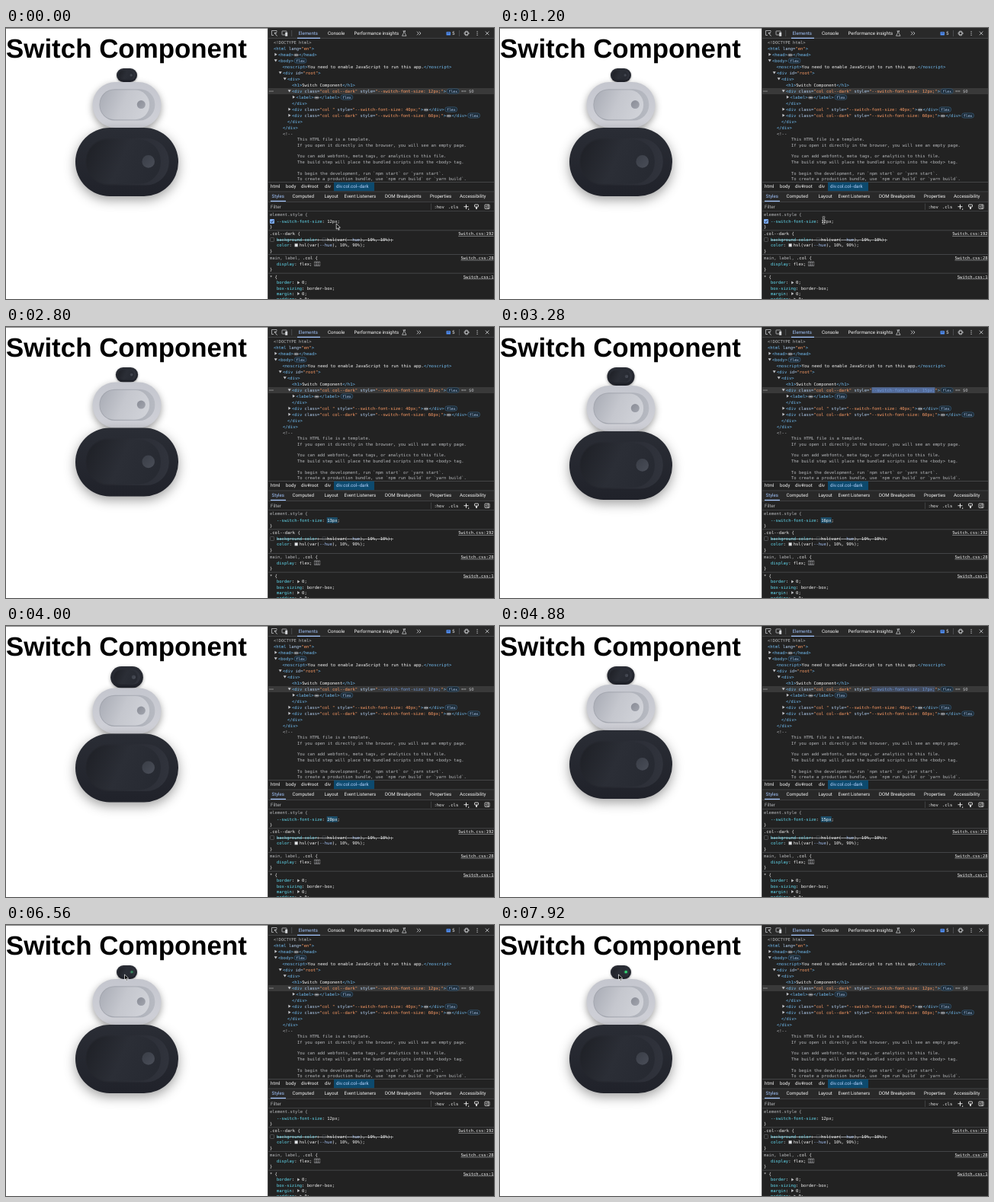
Recreate the animation shown at these times as an HTML page with a canvas. Size 640 px wide and 356 px high, loop 8 s.

```html
<!DOCTYPE html>
<html lang="en">
<head>
<meta charset="utf-8">
<title>Switch Component</title>
<style>
html, body { margin: 0; width: 100%; height: 100%; overflow: hidden; background: #fff; }
canvas { display: block; }
</style>
</head>
<body>
<canvas id="stage" width="640" height="356"></canvas>
<script>
const ctx = document.getElementById('stage').getContext('2d');
const LOOP = 8000;
const CH = 3.31; // width of one mono character
const MONO = '5.5px "DejaVu Sans Mono", monospace';
const UI = '6.15px Roboto, sans-serif';
const C = {
  panel: '#222222', bar: '#292929', line: '#5a5c60', text: '#f4f4f4', dim: '#b6b8bb',
  tag: '#72bdf2', attr: '#b4d0f2', value: '#ff9d66', prop: '#62dcf2', blue: '#a2c4fb', sel: '#0d4a6e'
};
const DARK = {
  base: ['#2a2d35', '#20222a'], rim: ['#23252c', '#30333c'],
  face: ['#1f2127', '#2b2e36', '#272a32'], knob: ['#3b3f48', '#4a4e58']
};
const LIGHT = {
  base: ['#c4c6ce', '#d0d1d8'], rim: ['#9fa2ab', '#b6b9c1'],
  face: ['#abaeb7', '#c5c7ce', '#d0d2d8'], knob: ['#8b8e98', '#a1a4ad']
};

// [time, px] steps: typed value, and the slower echo in the element tree
const TYPED = [[0, 12], [2640, 13], [2820, 14], [3000, 15], [3180, 16], [3390, 17], [3600, 18], [3800, 19], [3970, 20],
  [4200, 19], [4370, 18], [4540, 17], [4700, 16], [4860, 15], [5030, 14], [5200, 13], [5370, 12]];
const ECHO = [[0, 12], [2880, 13], [3240, 15], [3600, 17], [4150, 20], [4600, 17], [5050, 14], [5440, 12]];

const clamp = v => Math.max(0, Math.min(1, v));
const ease = v => { v = clamp(v); return v * v * (3 - 2 * v); };
const last = (steps, t) => steps.filter(s => s[0] <= t).pop() || steps[0];

function box(x, y, w, h, fill) { ctx.fillStyle = fill; ctx.fillRect(x, y, w, h); }

function pill(x, y, w, h, r, fill) {
  ctx.beginPath();
  ctx.roundRect(x, y, w, h, r);
  ctx.fillStyle = fill;
  ctx.fill();
}

function stroke(color, width, ...pts) {
  ctx.strokeStyle = color;
  ctx.lineWidth = width;
  ctx.beginPath();
  pts.forEach(([x, y], i) => i ? ctx.lineTo(x, y) : ctx.moveTo(x, y));
  ctx.stroke();
}

function ring(x, y, w, h, r, color, width = 0.6) {
  ctx.strokeStyle = color;
  ctx.lineWidth = width;
  ctx.beginPath();
  ctx.roundRect(x, y, w, h, r);
  ctx.stroke();
}

// y is the middle of the line; returns the right end
function text(s, x, y, color = C.text, font = MONO) {
  ctx.font = font;
  ctx.fillStyle = color;
  ctx.fillText(s, x, y + 1.7);
  return x + ctx.measureText(s).width;
}

function arrow(x, y, open, color = '#c4c6ca') {
  ctx.fillStyle = color;
  ctx.beginPath();
  if (open) { ctx.moveTo(x - 2, y - 1.7); ctx.lineTo(x + 2, y - 1.7); ctx.lineTo(x, y + 1.5); }
  else { ctx.moveTo(x - 1.3, y - 2.2); ctx.lineTo(x + 1.9, y - 0.2); ctx.lineTo(x - 1.3, y + 1.8); }
  ctx.fill();
}

function dots(x, y, step) {
  for (let i = 0; i < 3; i++) box(x + i * step, y, 0.9, 0.9, C.text);
}

function badge(x, y) {
  pill(x, y - 3.2, 16, 6.4, 3.2, '#1b2a36');
  ring(x, y - 3.2, 16, 6.4, 3.2, '#477193', 0.5);
  text('flex', x + 2.3, y - 0.1, '#b9d4fb', '4.8px "DejaVu Sans Mono", monospace');
}

function markup(src, x, y, flash = false) {
  for (const s of src.split(/(<\/?\w+|>|[\w-]+=|"[^"]*"|⋯|~)/)) {
    if (!s) continue;
    if (s === '~') { badge(x + 1.2, y); x += 20; continue; }
    if (s === '⋯') {
      pill(x + 0.5, y - 1.6, 6.5, 4, 2, '#5f6368');
      dots(x + 1.9, y, 1.5);
      x += 7.5;
      continue;
    }
    const color = /^<|>/.test(s) ? C.tag : /=$/.test(s) ? C.attr : s[0] === '"' ? C.value : C.text;
    if (flash && s.startsWith('"--')) {
      x = text('"', x, y, C.value);
      x = text(s.slice(1, -1), x, y, '#6f98d8');
      x = text('"', x, y, C.value);
    } else x = text(s, x, y, color);
  }
  return x;
}

function knobSwitch(top, em, pal, on = 0) {
  const cx = 158.5, cy = top + em * 0.75;
  const grad = (x0, y0, x1, y1, stops) => {
    const g = ctx.createLinearGradient(cx + x0 * em, cy + y0 * em, cx + x1 * em, cy + y1 * em);
    stops.forEach((c, i) => g.addColorStop(i / (stops.length - 1), c));
    return g;
  };
  const part = (x, y, w, h, r, fill) => pill(cx + x * em, cy + y * em, w * em, h * em, r * em, fill);
  ctx.save();
  ctx.shadowColor = 'rgba(0,0,0,.38)';
  ctx.shadowBlur = em * 0.24;
  ctx.shadowOffsetY = em * 0.08;
  part(-1.125, -0.75, 2.25, 1.5, 0.75, grad(0, -0.75, 0, 0.75, pal.base));
  ctx.restore();
  part(-0.9, -0.52, 1.82, 1.03, 0.5, grad(-0.9, 0, 0.9, 0, pal.rim));
  part(-0.88, -0.49, 1.62, 0.97, 0.47, grad(-0.85, -0.35, 0.6, 0.3, pal.face));
  ctx.beginPath();
  ctx.arc(cx + em * 0.47, cy - em * 0.01, em * 0.138, 0, 7);
  ctx.fillStyle = grad(0.35, -0.13, 0.6, 0.13, pal.knob);
  ctx.fill();
  if (on > 0) {
    ctx.save();
    ctx.globalAlpha = on;
    ctx.shadowColor = '#1fd36b';
    ctx.shadowBlur = 2;
    ctx.beginPath();
    ctx.arc(cx + em * 0.56, cy - 0.3, 1.6, 0, 7);
    ctx.fillStyle = '#35d873';
    ctx.fill();
    ctx.restore();
  }
}

function page(t) {
  box(0, 0, 343, 356, '#fff');
  box(0, 0, 343, 1, '#8a8a8a');
  text('Switch Component', 0, 36.8, '#000', 'bold 34.9px "Liberation Sans", Arial, sans-serif');
  const em = last(TYPED, t - 70)[1];
  const top = 53 + em * 1.5;
  knobSwitch(53, em, DARK, ease((t - 6380) / 480));
  knobSwitch(top, 40, LIGHT);
  knobSwitch(top + 60, 60, DARK);
}

function toolbar() {
  const icon = '#d4d6d9';
  box(343, 0, 297, 356, C.panel);
  box(343, 0, 297, 14, C.bar);
  box(343, 13.5, 297, 0.5, C.line);
  box(343, 0, 1, 356, '#4a4a4a');
  stroke(icon, 0.7, [351, 9.5], [348.5, 9.5], [348.5, 3.5], [355, 3.5], [355, 5.5]);
  stroke(icon, 0.9, [355.5, 10.5], [352, 6.5], [355, 6.5]);
  ring(362, 4, 6, 5, 0.5, icon, 0.7);
  box(366.2, 5.8, 3, 5, icon);
  box(374.5, 3, 0.6, 8, '#5f6368');
  text('Elements', 383.5, 7, C.blue, UI);
  text('Console', 422, 7, C.text, UI);
  text('Performance insights', 456.5, 7, C.text, UI);
  box(382, 12.7, 30, 1.3, C.blue);
  stroke(icon, 0.7, [520.5, 4], [524, 4], [523, 4], [523, 6.5], [525, 10.3], [519.5, 10.3], [521.5, 6.5], [521.5, 4]);
  for (const x of [539, 541.8]) stroke(icon, 0.8, [x, 4.7], [x + 2.2, 7], [x, 9.3]);
  pill(577.5, 5, 5.5, 4.6, 0.7, '#4f8df5');
  box(578.5, 6.2, 3.5, 0.6, C.bar);
  text('5', 585, 7, C.text, UI);
  box(594, 3, 0.6, 8, '#5f6368');
  ctx.strokeStyle = icon;
  ctx.lineWidth = 1;
  ctx.setLineDash([1.1, 0.8]);
  ctx.beginPath(); ctx.arc(604, 7, 3, 0, 7); ctx.stroke();
  ctx.setLineDash([]);
  ctx.beginPath(); ctx.arc(604, 7, 2.1, 0, 7); ctx.stroke();
  for (const y of [4.2, 6.5, 8.8]) box(617.5, y, 1.1, 1.1, icon);
  stroke(icon, 0.8, [628.8, 4.6], [633.4, 9.2]);
  stroke(icon, 0.8, [633.4, 4.6], [628.8, 9.2]);
}

function tree(t) {
  const [since, px] = last(ECHO, t);
  const age = since ? t - since : LOOP;
  const glow = 1 - clamp((age - 80) / 320);
  const row = (y, x, src, open) => {
    if (open !== undefined) arrow(x - 3.3, y, open);
    markup(src, x, y);
  };
  const styled = (cls, size) => `<div class="${cls}" style="--switch-font-size: ${size}px;">`;
  text('<!DOCTYPE html>', 351, 19, C.dim);
  row(27, 351, '<html lang="en">');
  row(35, 357, '<head>⋯</head>', false);
  row(43, 357, '<body>~', true);
  row(51, 362.5, '<noscript>You need to enable JavaScript to run this app.</noscript>');
  row(59, 363, '<div id="root">', true);
  row(67, 369, '<div>', true);
  row(75, 375, '<h1>Switch Component</h1>');

  box(344, 79, 296, 8, '#393939');
  dots(345.5, 82.6, 2);
  if (glow > 0) box(487.6, 79.3, 82.8, 7.4, `rgba(92,124,186,${0.75 * glow})`);
  arrow(371.7, 83, true);
  const end = markup(styled('col col--dark', px) + '~', 375, 83, age < 560);
  text('== $0', end, 83, C.dim);

  row(91, 380.5, '<label>⋯</label>~', false);
  row(99, 375, '</div>');
  row(107, 375, styled('col ', 40) + '⋯</div>~', false);
  row(115, 375, styled('col col--dark', 60) + '⋯</div>~', false);
  row(123, 369, '</div>');
  row(131, 363, '</div>');
  text('<!--', 363, 139, C.dim);
  ['This HTML file is a template.',
    'If you open it directly in the browser, you will see an empty page.', '',
    'You can add webfonts, meta tags, or analytics to this file.',
    'The build step will place the bundled scripts into the <body> tag.', '',
    'To begin the development, run `npm start` or `yarn start`.',
    'To create a production bundle, use `npm run build` or `yarn build`.'
  ].forEach((s, i) => text(s, 382, 146.5 + i * 7.4, C.dim));
}

function sidebarTabs() {
  box(344, 201.5, 296, 13.5, C.panel);
  box(344, 202, 296, 0.6, C.line);
  box(430, 202.6, 53, 11.6, C.sel);
  [['html', 347], ['body', 367], ['div#root', 387], ['div', 418], ['div.col.col--dark', 433]]
    .forEach(([s, x], i) => text(s, x, 208.2, i === 4 ? '#b3d0fc' : C.text, UI));
  box(344, 215, 296, 13, C.bar);
  box(344, 214.7, 296, 0.5, C.line);
  [['Styles', 348.5], ['Computed', 375.5], ['Layout', 417.5], ['Event Listeners', 443.5], ['DOM Breakpoints', 497],
    ['Properties', 556], ['Accessibility', 595]]
    .forEach(([s, x], i) => text(s, x, 221.4, i ? C.text : C.blue, UI));
  box(347, 226.8, 20, 1.3, C.blue);
  box(344, 228.2, 296, 0.5, C.line);

  box(344, 240.5, 296, 0.5, C.line);
  text('Filter', 347, 234.8, C.dim, UI);
  box(557, 230.5, 0.5, 8.5, C.line);
  text(':hov', 561.5, 234.8);
  text('.cls', 580, 234.8);
  box(600.5, 234.3, 6, 0.9, C.text);
  box(603, 231.8, 0.9, 6, C.text);
  box(606, 237.5, 1.2, 1.2, C.text);
  ring(614.5, 232, 5, 3, 0.5, C.text, 0.8);
  box(616.2, 235, 1.6, 3, C.text);
  ring(628, 232, 6, 5.5, 0.5, C.text, 0.7);
  box(631.8, 232, 0.7, 5.5, C.text);
  stroke(C.text, 0.7, [631, 233.5], [629.5, 234.8], [631, 236]);
}

function rules(t) {
  // returns where the value starts
  const prop = (name, y) => text(': ', text(name, 355, y, C.prop), y);
  const decl = (name, value, y) => text(value, prop(name, y), y);
  const link = (s, y) => {
    const w = s.length * CH;
    text(s, 639.5 - w, y);
    box(639.5 - w, y + 2.8, w, 0.5, '#c8cacd');
  };
  const rule = y => box(344, y, 296, 0.6, C.line);
  const tint = (name, light, fill, y) => {
    const x = prop(name, y) + 0.5;
    box(x, y - 2.2, 4, 4, fill);
    ring(x, y - 2.2, 4, 4, 0, '#8a8d90', 0.3);
    const mid = text('--hue', text('hsl(var(', x + 6, y), y, '#a5c3f7');
    text(`), 10%, ${light}%);`, mid, y);
  };
  const px = last(TYPED, t)[1];
  const editing = t >= 1500 && t < 6260;

  text('element.style {', 346, 245.5, C.dim);
  if (t < 1400) {
    pill(346, 251, 6, 6, 1, '#7cacf8');
    stroke('#1f2a3a', 0.9, [347.3, 254], [348.6, 255.5], [350.8, 252.5]);
  }
  if (editing) box(420.7, 250, 14, 7.6, '#1c4d69');
  decl('--switch-font-size', px + 'px;', 253.8);
  text('}', 346, 261.3);
  rule(265.6);

  text('.col--dark {', 346, 270.3);
  link('Switch.css:192', 270.3);
  ring(346.5, 275.5, 5, 5, 0.8, '#686a6e', 0.6);
  tint('background-color', 10, '#171a1c', 278.2);
  box(355, 278, 153, 0.6, '#d8dadc');
  tint('color', 90, '#e3e6e8', 285.5);
  text('}', 346, 292.8);
  rule(297.3);

  const end = text('main, label, ', 346, 302, C.dim);
  text('.col {', end, 302);
  link('Switch.css:28', 302);
  decl('display', 'flex;', 310);
  for (let i = 0; i < 3; i++) ring(404.5 + i * 2.6, 307, 2, 5.5, 0, '#c0c3c6', 0.5);
  box(404, 309.5, 8.5, 0.6, C.panel);
  text('}', 346, 317.3);
  rule(321.8);

  text('* {', 346, 326.8);
  link('Switch.css:1', 326.8);
  [['border', 1], ['box-sizing', 0], ['margin', 1], ['padding', 1]].forEach(([name, short], i) => {
    const y = 334.7 + i * 7.3;
    decl(name, short ? '  0;' : 'border-box;', y);
    if (short) arrow(355 + (name.length + 2) * CH + 2, y, false);
  });
}

function pointer(x, y) {
  ctx.beginPath();
  [[0, 0], [0, 7.2], [1.7, 5.7], [2.8, 8.3], [4, 7.8], [2.9, 5.2], [5.2, 5.1]]
    .forEach(([a, b], i) => i ? ctx.lineTo(x + a, y + b) : ctx.moveTo(x + a, y + b));
  ctx.closePath();
  ctx.fillStyle = '#000';
  ctx.fill();
  ctx.strokeStyle = '#fff';
  ctx.lineWidth = 0.7;
  ctx.stroke();
}

function beam(x, y) {
  for (const [color, w] of [['#fff', 1.8], ['#111', 0.8]]) {
    stroke(color, w, [x, y - 3.6], [x, y + 3.6]);
    stroke(color, w, [x - 1.7, y - 4], [x + 1.7, y - 4]);
    stroke(color, w, [x - 1.7, y + 4], [x + 1.7, y + 4]);
  }
}

function cursor(t) {
  if (t < 560) {
    const k = ease((t - 60) / 500);
    pointer(433.2 - 9 * k, 257 - 8 * k);
  } else if (t < 2640) beam(424.5, 252.5);
  else if (t >= 5600) {
    const k = ease((t - 5600) / 620);
    pointer(424.5 - 269 * k, 252 - 187 * k);
  }
}

function draw(now) {
  const t = now % LOOP;
  ctx.textRendering = 'geometricPrecision';
  page(t);
  toolbar();
  tree(t);
  sidebarTabs();
  rules(t);
  cursor(t);
}

const start = performance.now();
function tick() {
  draw(performance.now() - start);
  requestAnimationFrame(tick);
}
tick();
</script>
</body>
</html>
```
